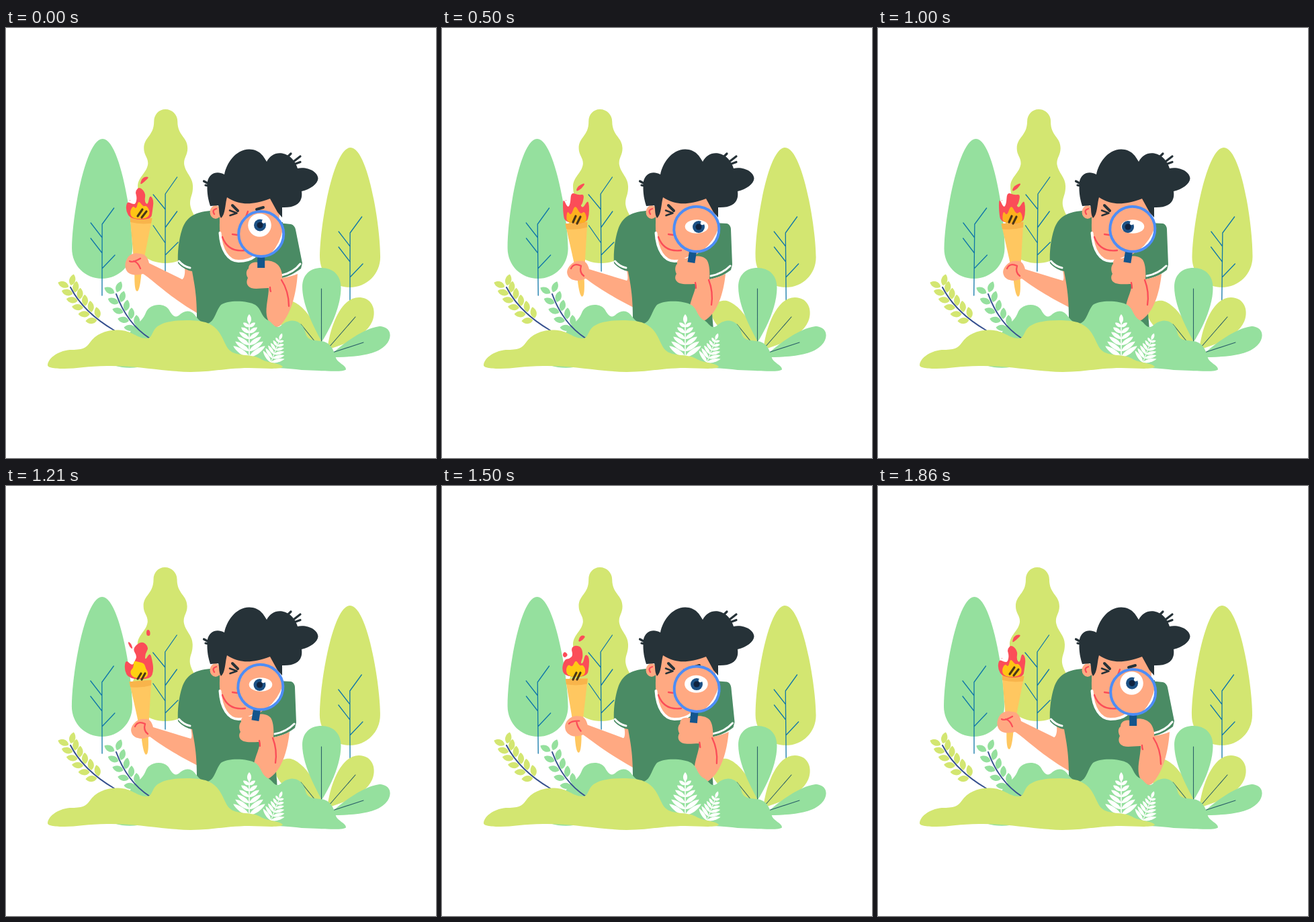
Write an HTML page that moves like this. It is 640x640 px and loops after 1930 ms.

```html
<!DOCTYPE html>
<html lang="en">
<head>
<meta charset="utf-8">
<title>Explorer with a torch</title>
<style>
  html, body { margin: 0; width: 100%; height: 100%; overflow: hidden; background: #fff; }
  svg { display: block; width: 100vw; height: 100vh; }
  .line { fill: none; stroke-linecap: round; stroke-linejoin: round; }
</style>
</head>
<body>
<svg id="stage" viewBox="0 0 640 640"></svg>
<script>
const LIME = '#d3e671', MINT = '#95e09e', SKIN = '#ffa982', SHIRT = '#4a8b64',
      HAIR = '#263238', RED = '#fb4d58', TWIG = '#0f76a8', STEM = '#36508f';
const FRAMES = 27, FRAME_MS = 1000 / 14, LOOP_MS = 1930;

const shape = (d, fill, id = '') => `<path id="${id}" d="${d}" fill="${fill}"/>`;
const line = (d, stroke, width, id = '') =>
  `<path id="${id}" class="line" d="${d}" stroke="${stroke}" stroke-width="${width}"/>`;

function leaf(x, y, degrees, length, width, fill) {
  const d = `M0 0C${length * .25} ${-width * .75} ${length * .75} ${-width * .6} ${length} 0` +
            `C${length * .75} ${width * .6} ${length * .25} ${width * .75} 0 0`;
  return `<path transform="translate(${x} ${y}) rotate(${degrees})" d="${d}" fill="${fill}"/>`;
}

function sprig([x0, y0], [x1, y1], [x2, y2], pairs, fill) {
  let out = '';
  for (let k = 0; k < pairs; k++) {
    const t = 1 - k * .88 / pairs, s = 1 - t;
    const x = s * s * x0 + 2 * s * t * x1 + t * t * x2;
    const y = s * s * y0 + 2 * s * t * y1 + t * t * y2;
    const angle = Math.atan2(s * (y1 - y0) + t * (y2 - y1), s * (x1 - x0) + t * (x2 - x1));
    for (const side of [-1, 1]) {
      const a = angle + side * .72;
      out += leaf(x + 3 * Math.cos(a), y + 3 * Math.sin(a), a * 180 / Math.PI, 17, 9, fill);
    }
  }
  return out + line(`M${x0} ${y0}Q${x1} ${y1} ${x2} ${y2}`, STEM, 2);
}

function fern(transform) {
  let out = line('M0 0V-60', '#fff', 1.6) + leaf(0, -55, -90, 14, 6, '#fff');
  for (let k = 0; k < 6; k++)
    for (const side of [-1, 1]) {
      const angle = side > 0 ? -35 : -145;
      out += leaf(0, -5 - k * 9, angle, 29 - k * 3.6, 7 - k * .4, '#fff');
    }
  return `<g transform="${transform}">${out}</g>`;
}

const ovalTree = fill => shape('M143.5 165C118 165 98 280 98 328C98 353 117 373 143 373' +
    'C168 373 188 353 188 328C188 280 169 165 143.5 165Z', fill) +
  line('M143 398V292L160.500 268M143 312L126 290M143 335L126 313M143 358L162 338', TWIG, 1.3);

const wavyTree = shape('M237 121C247 121 255 129 255 139C255 161 270 162 270 179C270 190 264 193 265 203' +
    'C267 216 278 222 278 236C278 250 273 252 274 263C276 277 286 282 286 303C286 332 264 350 237 350' +
    'C210 350 188 332 188 303C188 282 198 277 200 263C201 252 196 250 196 236C196 222 209 216 211 203' +
    'C212 193 205 190 205 179C205 162 220 161 220 139C220 129 227 121 237 121Z', LIME) +
  line('M237 362V247L254.500 222M237 270L219 248M237 297L254.500 273M237 320L219 294M237 338L256 319', TWIG, 1.3);

const rightPlant =
  shape('M470 470C465 445 445 412 424 406C405 404 398 420 402 430C410 450 440 470 470 470Z', LIME) +
  shape('M478 479C483 440 500 401 525 401C545 401 552 420 545 437C535 460 500 472 478 479Z', LIME) +
  shape('M480 490C505 465 540 444 558 444C573 446 576 460 565 472C550 488 515 490 480 490Z', MINT) +
  shape('M470 467C455 440 441 410 441 385C441 367 453 357 469.500 357C487 357 498.500 368 498.500 387C498.500 410 487 440 470 467Z', MINT) +
  line('M469.500 388V467M520 430L480 476M532 468L486 483M439 441L460 467', '#2b6068', 1.1);

const body = shape('M304 272C280 274 268 282 262 300C257 315 255 335 256 350C262 357 270 361 277 362' +
    'C281 385 285 400 284 450H404C402 420 398 390 400 372L412 320V289H370Z', SHIRT) +
  line('M257.500 347Q264 355 274 357', '#fff', 3);

const head =
  shape('M318 250H393L408 268L405 300C400 320 385 335 370 342C362 347 354 348 345 347C325 344 317 320 318 290Z', SKIN) +
  line('M318.500 305C320 331 331 347 346 347C356 347 364 345 370 340', '#fff', 4) +
  `<ellipse cx="312" cy="274" rx="8.500" ry="10" fill="${SKIN}"/>` +
  line('M313 269Q306 271 310 277M322 311C328 328 340 333 356 331M337 307L344 308M360 273L357 281', RED, 2.3) +
  shape('M320 283C316 276 318 270 316 264L304 265C299 250 299 238 300 228C303 216 314 212 325 218' +
    'C328 202 341 181 362 180.500C377 181 383 190 388 199C393 189 402 185 411 186.500C424 189 431 199 434 209' +
    'C449 206 464 214 464.500 224C464 232 453 240 440 243C442 258 434 268 411 267L411 282L404 274' +
    'L393 254C365 264 348 264 329 252C326 261 327 277 320 283Z', HAIR) +
  line('M420 191L424 187M429 198L438 191M431 202L438 199.500M294.500 228L302 232M297 234L302 235', HAIR, 3.2) +
  line('M337 264L345 272M373 270L383 267', HAIR, 4) +
  line('M333 271.500L343.500 275.500L333.500 279', HAIR, 2.6);

const torch = `<g id="torch">` +
  shape('M-16.500 -1H16.500L9 52L5 84Q4 109 0 109Q-4 109 -5 84L-9 52Z', '#ffc760') +
  shape('M-16.500 -1H16.500L15.500 7Q0 10 -15.500 7Z', '#f8b44b') + `</g>`;

const flame = shape('', RED, 'flame') + shape('', RED, 'puff') + shape('', RED, 'spark') +
  shape('', '', 'core') + line('', '#4a3718', 3.2, 'sticks');

const glass = `<g id="glass">
  <rect x="-5.500" y="34" width="11" height="16.500" fill="#14558c"/>
  <circle r="33.500" fill="${SKIN}"/>` +
  shape('M32.500 -9Q29 14 14 30A33 33 0 0 0 32.500 -9Z', '#fff') +
  `<circle r="33.500" fill="none" stroke="#4d8df6" stroke-width="4"/></g>
  <ellipse id="eye" fill="#fff"/>
  <g id="iris"><circle r="9" fill="#1c5185"/><circle r="4.500" fill="#10233f"/>
  <circle cx="5.500" cy="-5.500" r="2.700" fill="#fff"/></g>`;

const mintBush = shape('M160 502C175 480 180 458 190 444C200 437 205 432 208 424C213 410 236 408 243 420' +
    'C247 427 251 432 257 428C265 420 274 419 281 427C287 435 293 441 300 440C311 437 312 421 320 412' +
    'C331 404 361 406 371 412C380 418 380 429 388 434C396 437 398 445 404 445C411 445 411 437 426 435.500' +
    'C438 436 444 445 446 455C450 468 465 464 474 467C485 471 488 481 491 491C493 498 506 502 506 508' +
    'C504 513 470 510 440 509C420 506 390 506 360 502L210 502C195 506 180 508 160 502Z', MINT);

const limeBush = shape('M62 502C62 493 75 481 95 479C113 479 119 477 125 468C133 456 149 449 167 449.500' +
    'C188 450 194 462 210 462C220 461 215 448 231 441C244 434 281 433 297 438C322 447 322 467 332 479' +
    'C343 490 364 484 378 492C389 499 407 498 412 504C409 509 382 506 362 506C330 506 305 512 275 512' +
    'C230 511 195 502 150 503C123 503 105 507 87 507C75 507 62 506 62 502Z', LIME);

document.getElementById('stage').innerHTML =
  `<g id="treeA">${ovalTree(MINT)}</g><g id="treeB">${wavyTree}</g>
   <g id="treeC"><g transform="translate(369 13)">${ovalTree(LIME)}</g></g>` +
  rightPlant + torch + flame + shape('', SKIN, 'leftArm') + line('', RED, 2.3, 'leftLines') +
  body + shape('', SHIRT, 'sleeve') + line('', '#fff', 3, 'hem') + head +
  shape('', SKIN, 'rightArm') + line('', RED, 2.3, 'rightLines') + glass + mintBush +
  fern('translate(362 495)') + fern('translate(393 501) rotate(21) scale(.72)') +
  sprig([161, 450], [115, 423], [96, 386], 6, LIME) +
  sprig([214, 462], [180, 440], [164, 396], 5, MINT) + limeBush;

// Each limb part: pose with the glass low, pose with the glass raised.
const limbs = {
  leftArm: [
    'M213 350C211 341 207 336 199 336C192 334 184 337 181 342C177 348 176 356 180 362C185 369 196 368 204 366C215 372 240 398 284 424L290 380L277 360L266 358C267 365 265 374 262 374Z',
    'M219 359C217 351 213 346 207 347C198 345 190 352 187 359C184 366 189 374 196 375C203 378 210 374 214 373C230 385 250 398 285 416L290 380L285 360L274 358C277 366 277 376 275 376Z'],
  leftLines: [
    'M184 347Q188 350 200 343M190 347Q197 349 200 358',
    'M192 358Q196 349 207 354M207 354Q204 364 211 369'],
  sleeve: [
    'M405 290L424 292C428 293 430 296 431 300L441 350L439 358C430 365 420 370 411 372L395 372Z',
    'M405 290L424 291C428 292 430 296 430 300L432 352L430 360C420 368 410 372 398 374L390 372Z'],
  hem: ['M410 368Q428 364 438 351', 'M400 369Q417 366 429 354'],
  rightArm: [
    'M411 372Q424 370 434 366C432 395 425 425 408 443C400 449 390 440 388 428C386 415 391 400 391 387C380 387 372 389 365 387C358 384 357 378 360 372C357 367 357 361 361 358C361 351 368 347 376 349C385 344 400 346 406 354C412 362 411 372 411 372Z',
    'M398 374Q410 372 422 366C419 395 410 425 390 436C380 441 370 437 368 428C366 410 377 395 378 381C368 381 360 382 354 380C346 377 346 370 349 366C346 360 347 354 350 351C349 344 355 341 363 343C375 338 388 338 394 345C400 354 398 374 398 374Z'],
  rightLines: [
    'M393 386Q393 390 394 392M410 375Q421 392 421 414',
    'M377 379Q378 383 378 387M397 375Q404 393 401 412']
};

const flames = {
  calm: {
    flame: '186 285 178 272 180 258 188 262 193 262 195 252 192 243 199 236 208 246 206 258 211 264 214 248 220 256 218 272 216 285',
    core: '188 284 184 274 189 264 194 270 197 256 204 266 209 264 215 274 210 284',
    puff: '199 234 203 222 214 221 206 229', spark: '184 256 185 256 185 257 184 257',
    fill: 'rgb(255,196,20)', sticks: 'M196 280L203 270M202 282L209 273' },
  burst: {
    flame: '183 287 176 274 178 258 188 268 192 260 195 253 188 242 202 230 213 240 207 250 207 260 214 248 217 256 220 274 215 288',
    core: '189 286 184 276 190 270 190 260 198 262 206 264 208 272 212 278 209 286',
    puff: '209 223 209 214 214 214 215 223', spark: '181 231 186 234 189 243 184 240',
    fill: 'rgb(255,208,16)', sticks: 'M196 287L201 279M202 288L207 279' },
  curl: {
    flame: '183 290 180 274 180 252 187 268 191 262 192 244 203 249 212 247 209 262 206 264 210 268 217 256 219 264 219 278 215 291',
    core: '186 290 185 280 187 272 192 280 198 262 206 278 212 272 216 284 212 291',
    puff: '199 244 202 235 214 230 208 239', spark: '184 256 185 256 185 257 184 257',
    fill: 'rgb(253,176,30)', sticks: 'M195 289L199 280M201 291L206 281' },
  split: {
    flame: '185 284 178 274 182 258 190 257 195 252 192 241 199 237 208 240 210 254 206 264 210 264 213 250 219 254 219 268 216 284',
    core: '188 284 184 274 188 265 194 270 199 258 205 268 210 266 214 274 211 284',
    puff: '202 233 206 222 214 223 210 229', spark: '179 252 182 246 188 251 183 256',
    fill: 'rgb(255,200,20)', sticks: 'M195 288L200 278M201 288L206 278' }
};
const flameKeys = [[0, 'calm'], [3, 'burst'], [7, 'curl'], [10, 'burst'], [14, 'curl'],
                   [17, 'burst'], [21, 'split'], [24, 'burst'], [26, 'calm'], [27, 'calm']];
const swayKeys = [[0, .3], [3, -1], [6.5, -2], [10, -.5], [13.5, 2.4]];
const poseKeys = [[0, 0], [4.5, 1], [18, 1], [25, 0], [27, 0]];
const gazeKeys = [[0, 378], [3, 379], [7, 382], [14, 372], [17, 377.5], [21, 379], [27, 378]];

const lerp = (a, b, u) => a + (b - a) * u;
const smooth = u => u * u * (3 - 2 * u);
const numbers = text => text.match(/-?[\d.]+/g).map(Number);

function mix(from, to, u) {
  const ends = numbers(to);
  let n = 0;
  return from.replace(/-?[\d.]+/g, v => +lerp(+v, ends[n++], u).toFixed(2));
}

function segment(keys, f) {
  let k = 1;
  while (k < keys.length - 1 && f > keys[k][0]) k++;
  const [start, from] = keys[k - 1], [end, to] = keys[k];
  return [from, to, (f - start) / (end - start)];
}

function valueAt(keys, f) {
  const [from, to, u] = segment(keys, f);
  return lerp(from, to, smooth(u));
}

// Closed curve through the midpoints of a point list.
function blob(text) {
  const v = numbers(text), n = v.length;
  const mid = i => `${(v[i % n] + v[(i + 2) % n]) / 2} ${(v[(i + 1) % n] + v[(i + 3) % n]) / 2}`;
  let d = `M${mid(0)}`;
  for (let i = 2; i <= n; i += 2) d += `Q${v[i % n]} ${v[(i + 1) % n]} ${mid(i)}`;
  return d + 'Z';
}

function set(id, attributes) {
  const node = document.getElementById(id);
  for (const name in attributes) node.setAttribute(name, attributes[name]);
}

function draw(f) {
  const sway = valueAt(swayKeys, Math.min(f, FRAMES - f));
  for (const [id, top, base] of [['treeA', 165, 373], ['treeB', 121, 350], ['treeC', 178, 386]]) {
    const skew = -sway / (base - top);
    set(id, { transform: `matrix(1 0 ${skew} 1 ${-skew * base} 0)` });
  }

  const p = valueAt(poseKeys, f);
  for (const id in limbs) set(id, { d: mix(...limbs[id], p) });
  set('torch', { transform: `translate(${lerp(201, 200, p)} ${lerp(283, 291, p)}) rotate(${lerp(3.2, -4.6, p)})` });
  set('glass', { transform: `translate(${lerp(379.7, 378.8, p)} ${lerp(306.5, 299.3, p)}) rotate(${9 * p})` });
  set('eye', { cx: lerp(377.5, 379, p), cy: lerp(293.5, 295.5, p), rx: 17.3, ry: lerp(17.3, 10.2, p) });
  set('iris', { transform: `translate(${valueAt(gazeKeys, f)} ${lerp(293.5, 296, p)})` });

  const [from, to, u] = segment(flameKeys, f), a = flames[from], b = flames[to];
  for (const id of ['flame', 'core', 'puff', 'spark']) set(id, { d: blob(mix(a[id], b[id], u)) });
  set('core', { fill: mix(a.fill, b.fill, u) });
  set('sticks', { d: mix(a.sticks, b.sticks, u) });
}

const start = performance.now();
function tick() {
  const t = (performance.now() - start) % LOOP_MS;
  draw(Math.min(FRAMES - 1, Math.floor((t + 5) / FRAME_MS)));
  requestAnimationFrame(tick);
}
tick();
</script>
</body>
</html>
```
